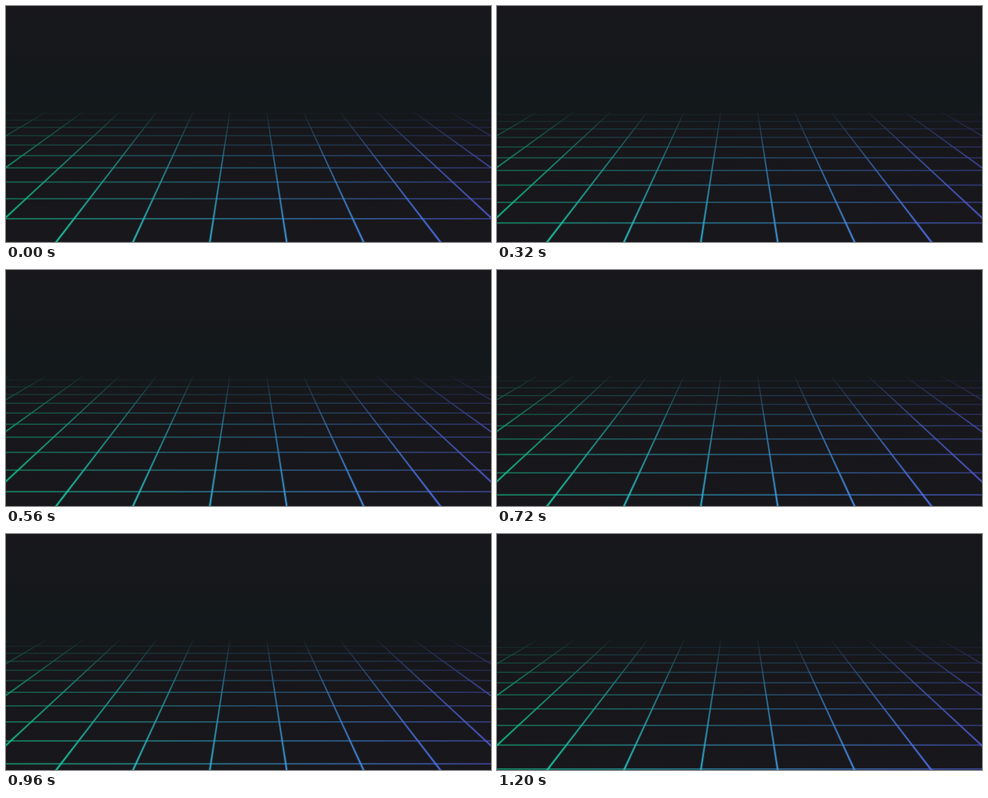
An HTML page that plays this animation: 640 px wide and 311 px high, repeating every 1.28 s.

```html
<!DOCTYPE html>
<html lang="en">
<head>
<meta charset="utf-8">
<title>Perspective grid</title>
<style>
  html, body { margin: 0; width: 100%; height: 100%; overflow: hidden; background: #18181b; }
  svg { display: block; width: 100%; height: 100%; }
</style>
</head>
<body>
<svg viewBox="0 0 640 311" preserveAspectRatio="none">
  <defs>
    <linearGradient id="sky" x1="0" y1="0" x2="0" y2="1">
      <stop offset="0" stop-color="#18181c"/>
      <stop offset=".2" stop-color="#16181b"/>
      <stop offset=".37" stop-color="#12181b"/>
      <stop offset=".43" stop-color="#13181b"/>
      <stop offset=".53" stop-color="#17171b"/>
      <stop offset="1" stop-color="#18171b"/>
    </linearGradient>
    <linearGradient id="hue" gradientUnits="userSpaceOnUse" x1="0" y1="0" x2="640" y2="0">
      <stop offset="0" stop-color="#12d492"/>
      <stop offset=".12" stop-color="#1ccbaa"/>
      <stop offset=".28" stop-color="#2abfc4"/>
      <stop offset=".5" stop-color="#35a5dc"/>
      <stop offset=".72" stop-color="#4590ec"/>
      <stop offset=".88" stop-color="#4f74ee"/>
      <stop offset="1" stop-color="#565fe4"/>
    </linearGradient>
    <linearGradient id="fade" gradientUnits="userSpaceOnUse" x1="0" y1="135" x2="0" y2="311">
      <stop offset="0" stop-color="#fff" stop-opacity="0"/>
      <stop offset=".13" stop-color="#fff" stop-opacity=".3"/>
      <stop offset=".4" stop-color="#fff" stop-opacity=".7"/>
      <stop offset="1" stop-color="#fff" stop-opacity="1"/>
    </linearGradient>
    <mask id="haze" maskUnits="userSpaceOnUse" x="0" y="0" width="640" height="311">
      <rect y="135" width="640" height="176" fill="url(#fade)"/>
    </mask>
  </defs>
  <rect width="640" height="311" fill="url(#sky)"/>
  <g mask="url(#haze)" fill="url(#hue)">
    <path id="rowGlow" opacity=".16"/>
    <path id="rows" opacity=".62"/>
    <path id="railGlow" opacity=".2"/>
    <path id="rails" opacity=".88"/>
  </g>
</svg>
<script>
  const LOOP = 1280, STEP = 80;
  const CX = 319.7, VANISH = -17.5, BASE = 311;
  const GAP = 101.4;                          // rail spacing at the bottom edge
  const NEAR = 0.0033613, PITCH = 0.000326;   // inverse depth of rows
  const $ = id => document.getElementById(id);

  function railPath(width) {
    let d = '';
    for (let i = -8; i < 8; i++) {
      const x = CX + (i + 0.5) * GAP;
      // keep the thickness across a slanted rail even
      const half = width / 2 * Math.hypot(1, (x - CX) / (BASE - VANISH));
      d += `M${CX} ${VANISH}L${x - half} ${BASE}H${x + half}Z`;
    }
    return d;
  }

  function rowPath(phase, width) {
    let d = '';
    for (let n = -1; n < 10; n++) {
      const depth = 1 / (NEAR + (n - phase) * PITCH);
      const y = VANISH + depth + 0.3;
      const h = width * (0.55 + 0.45 * (depth / 300) ** 2);
      d += `M0 ${y - h / 2}H640V${y + h / 2}H0Z`;
    }
    return d;
  }

  function draw(time) {
    const k = Math.floor((time % LOOP) / STEP);
    // slow start, then one row every 15 steps
    const phase = Math.max(k * 0.02, (k - 1) / 15 - 0.007);
    $('rows').setAttribute('d', rowPath(phase, 1.25));
    $('rowGlow').setAttribute('d', rowPath(phase, 2.8));
  }

  $('rails').setAttribute('d', railPath(2));
  $('railGlow').setAttribute('d', railPath(4.2));

  const start = performance.now();
  function tick() {
    draw(performance.now() - start);
    requestAnimationFrame(tick);
  }
  tick();
</script>
</body>
</html>
```
